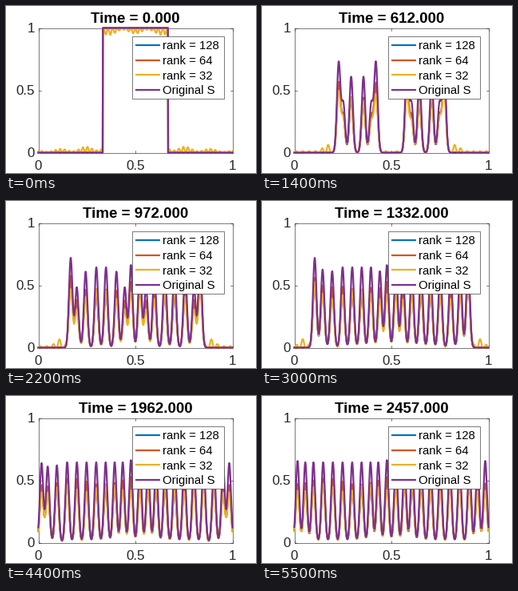
Recreate the animation shown at these times as a matplotlib script. Size 313 by 209 pixels, loop 5.6 s.

```python
import numpy as np
import matplotlib.pyplot as plt
from matplotlib.animation import FuncAnimation
from matplotlib.patches import Rectangle

W, H, DPI = 313, 209, 64
FRAMES, STEP = 56, 100
LEFT, RIGHT, TOP, BOTTOM = 40.5, 283.5, 27.5, 183.5
MID = (LEFT + RIGHT) / 2
GAP = 12.2                      # spacing of settled pulses
SEED = MID - 3.5 * GAP          # where the left family of pulses is born
BLUE, RED, YELLOW, PURPLE = "#0072BD", "#D95319", "#EDB120", "#7E2F8E"
INK = "#262626"

plt.rcParams["font.family"] = "Liberation Sans"


def px(n):
    return n * 72 / DPI


fig = plt.figure(figsize=(W / DPI, H / DPI), dpi=DPI, facecolor="white")
ax = fig.add_axes([0, 0, 1, 1])
ax.set_xlim(0, W)
ax.set_ylim(H, 0)
ax.axis("off")

x = np.linspace(LEFT, RIGHT, 973)
dist = np.abs(x - MID)


def line(xs, ys, color, width, z, **kw):
    return ax.plot(xs, ys, color=color, lw=px(width), zorder=z, **kw)[0]


def label(lx, ly, text, size, ha, color=INK, z=2, **kw):
    return ax.text(lx, ly, text, fontsize=px(size), ha=ha, va="baseline",
                   color=color, zorder=z, **kw)


def box(x0, y0, x1, y1, z, fill):
    ax.add_patch(Rectangle((x0, y0), x1 - x0, y1 - y0, fc=fill, ec=INK,
                           lw=px(0.6), zorder=z))


def draw_axes():
    box(LEFT, TOP, RIGHT, BOTTOM, 1, "none")
    for frac, name in ((0, "0"), (0.5, "0.5"), (1, "1")):
        tx = LEFT + frac * (RIGHT - LEFT)
        ty = BOTTOM - frac * (BOTTOM - TOP)
        for y0, d in ((TOP, 3), (BOTTOM, -3)):
            line([tx, tx], [y0, y0 + d], INK, 0.6, 1)
        for x0, d in ((LEFT, 3), (RIGHT, -3)):
            line([x0, x0 + d], [ty, ty], INK, 0.6, 1)
        label(tx, 205, name, 17, "center")
        label(36, ty + 5.8, name, 17, "right")


def draw_legend():
    box(157.5, 37.5, 272.5, 115.5, 10, "white")
    rows = (("rank = 128", BLUE), ("rank = 64", RED),
            ("rank = 32", YELLOW), ("Original S", PURPLE))
    for i, (name, color) in enumerate(rows):
        y = 48.8 + 18.7 * i
        line([162, 193], [y, y], color, 2.2, 11, solid_capstyle="butt")
        label(196, y + 5.4, name, 14.9, "left", "black", 12)


def front(t):
    """Leftmost pulse, running on past the wall."""
    return np.interp(t, [0, 60, 612, 972, 1332, 1602, 1962, 2457],
                     [121.5, SEED, 96, 81, 66, 54.3, 40, 20])


def squeeze(spot, t):
    """Push pulses back from the middle, where two families meet."""
    push = np.interp(t, [700, 1332, 2457], [0, 7, 10])
    return spot - push * np.exp((spot - MID) / 14)


def pulses(t):
    """(centre, height) of every pulse left of the middle."""
    lead = front(t)
    birth = np.interp(t, [60, 200], [0.32, 0.72])
    out = [(max(lead, 44.5), birth * np.interp(lead, [38, 42, 50], [0.91, 0.86, 1]))]

    inner = min(2 * SEED - lead, 156.4) if t > 60 else lead
    out.append((inner, birth * np.interp(t, [700, 972], [1, 0.92])))

    homes = [MID - k * GAP for k in range(4, 9)] + [54.2]
    for i, home in enumerate(homes):
        s = home - lead
        if s <= 1:
            continue
        height = np.interp(s, [1, 4.5, 7, 10, 14, 22, 30],
                           [0, 0.38, 0.43, 0.63, 0.61, 0.61, 0.645])
        spot = home + np.interp(s, [0, 4.5, 7, 10, 14, 22, 30],
                                [2, 1, 0, -0.5, -2, -1, 0])
        out.append((squeeze(spot, t), height))
        if i < 3:
            out.append((squeeze(2 * SEED - spot, t), height))
    return out


def profile(t, sigma):
    total = np.zeros_like(x)
    for c, h in pulses(t):
        for centre in (c, 2 * MID - c):
            total += h * np.exp(-((x - centre) / sigma) ** 2 / 2)
    slab = 1 / (1 + np.exp((dist - 40.5) / 1.2))
    return total + slab * np.exp(-t / 10)


def curves(t):
    if t == 0:
        exact = (dist < 40.9).astype(float)
        wave = np.sin(dist * 0.55) ** 2 * (0.65 + 0.35 * np.cos(dist / 5))
        size = np.where(dist < 41, 0.045 + 0.03 * (dist / 41) ** 4,
                        0.065 * np.exp(-(dist - 41) / 70))
        return exact, exact, np.abs(exact - size * wave), exact
    exact = profile(t, 2.2)
    calm = np.exp(-12 * exact)
    near = np.exp(-((dist - (MID - front(t) + 15)) / 6) ** 2)
    ripple = np.sin(dist / 2.55 - 1.12) ** 2
    red = profile(t, 2.25) * (0.76 + 0.04 * np.cos(dist / 13))
    yellow = (profile(t, 2.35) * (0.7 + 0.05 * np.cos(dist / 9 + t / 800))
              + calm * (0.025 + 0.055 * near) * ripple - 0.012)
    return red * 0.99, red, yellow, exact


draw_axes()
draw_legend()
title = label(MID, 21, "", 18.7, "center", "black", weight="bold")
plots = [line(x, x, c, 2.2, 3 + i, solid_joinstyle="round")
         for i, c in enumerate((BLUE, RED, YELLOW, PURPLE))]


def update(i):
    t = 45 * i - 18 if i else 0
    title.set_text(f"Time = {t:.3f}")
    for plot, v in zip(plots, curves(t)):
        plot.set_ydata(BOTTOM - np.clip(v, 0, 1) * (BOTTOM - TOP))
    return [title, *plots]


anim = FuncAnimation(fig, update, frames=FRAMES, interval=STEP,
                     init_func=lambda: update(0), repeat=True, repeat_delay=0)
plt.show()
```
